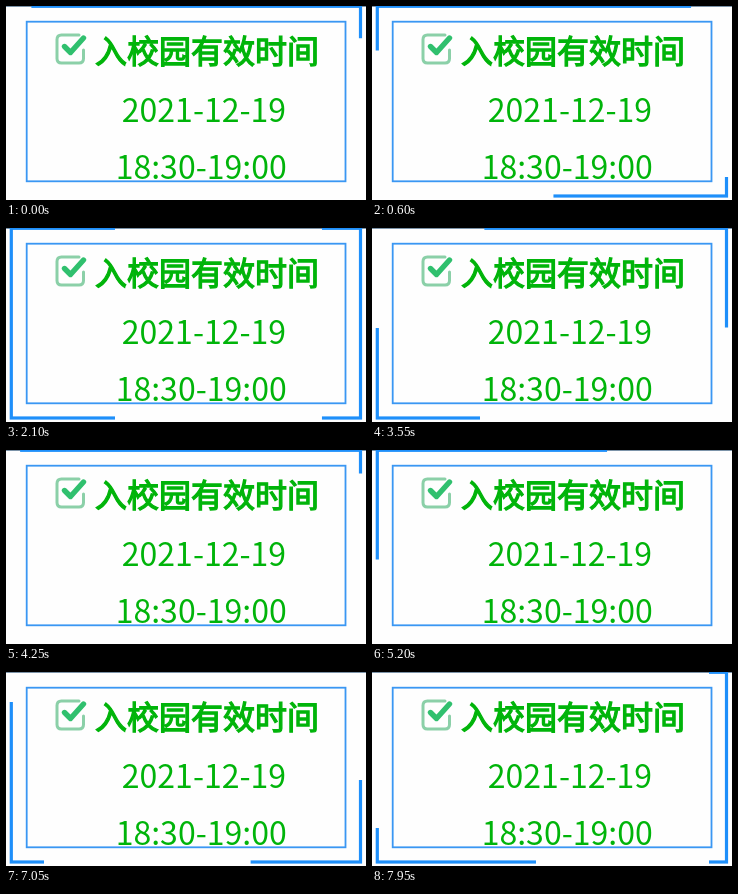
These frames come from a looping animation (360x194 px, 8 s). An HTML page:

```html
<!DOCTYPE html>
<html lang="zh">
<head>
<meta charset="utf-8">
<style>
  html, body { margin: 0; width: 100%; height: 100%; overflow: hidden; background: #fefefe; }
  svg { display: block; width: 360px; height: 194px; }
  text { font-family: "Noto Sans CJK SC", "Noto Sans CJK", "Noto Sans", sans-serif; font-size: 32px; fill: #00b40a; }
  .title { stroke: #00b40a; stroke-width: 1.3; }
  .frame { fill: none; stroke: #1e8ffa; stroke-width: 3.2; }
</style>
</head>
<body>
<svg viewBox="0 0 360 194">
  <clipPath id="clipA"><rect/></clipPath>
  <clipPath id="clipB"><rect/></clipPath>

  <rect width="360" height="1" fill="#7c93a8"/>
  <rect x="20.7" y="15.7" width="318.8" height="159.6" fill="none" stroke="#3a97f3" stroke-width="1.8"/>

  <g fill="none" stroke-linecap="round" stroke-linejoin="round">
    <path d="M73 29H55.5Q51 29 51 33.5V52.5Q51 57 55.500 57H73Q77.500 57 77.500 52.500V44" stroke="#8bd0a8" stroke-width="3"/>
    <path d="M58.500 40.500L64.500 46.500L77.500 32" stroke="#30c06e" stroke-width="5.400"/>
  </g>

  <text class="title" x="89" y="56.800">入校园有效时间</text>
  <text x="198" y="115.500" text-anchor="middle">2021-12-19</text>
  <text x="195.200" y="173" text-anchor="middle">18:30-19:00</text>

  <rect class="frame" x="5.300" y="0.300" width="349.200" height="189.700" clip-path="url(#clipA)"/>
  <rect class="frame" x="5.300" y="0.300" width="349.200" height="189.700" clip-path="url(#clipB)"/>
</svg>
<script>
  const LOOP = 8000, CYCLE = 10000, QUARTER = CYCLE / 4;

  // Clip window as left, top, right, bottom: top edge, left edge, bottom edge, right edge.
  const WINDOWS = [
    [3, -1, 357, 15],
    [3, -1, 7, 286],
    [3, 349, 357, 350],
    [354, -1, 357, 286]
  ];
  const runners = [
    { rect: document.querySelector('#clipA rect'), start: 330 },
    { rect: document.querySelector('#clipB rect'), start: 4330 }
  ];

  // The motion begins slightly ahead and settles into a steady pace.
  const paced = t => t < 400 ? 170 + t * 230 / 400 : t;

  function windowAt(time) {
    const phase = ((time % CYCLE) + CYCLE) % CYCLE / QUARTER;
    const i = Math.floor(phase), k = phase - i;
    const next = WINDOWS[(i + 1) % 4];
    const w = WINDOWS[i].map((v, n) => v + (next[n] - v) * k);
    // Only the top and right windows limit the lower side.
    if (i === 1 || i === 2) w[3] = 400;
    return w;
  }

  function draw(now) {
    const time = paced(now % LOOP);
    for (const { rect, start } of runners) {
      const [l, t, r, b] = windowAt(time - start);
      rect.setAttribute('x', l);
      rect.setAttribute('y', t);
      rect.setAttribute('width', Math.max(0, r - l));
      rect.setAttribute('height', Math.max(0, b - t));
    }
  }

  const origin = performance.now();
  function tick() {
    draw(performance.now() - origin);
    requestAnimationFrame(tick);
  }
  tick();
</script>
</body>
</html>
```
